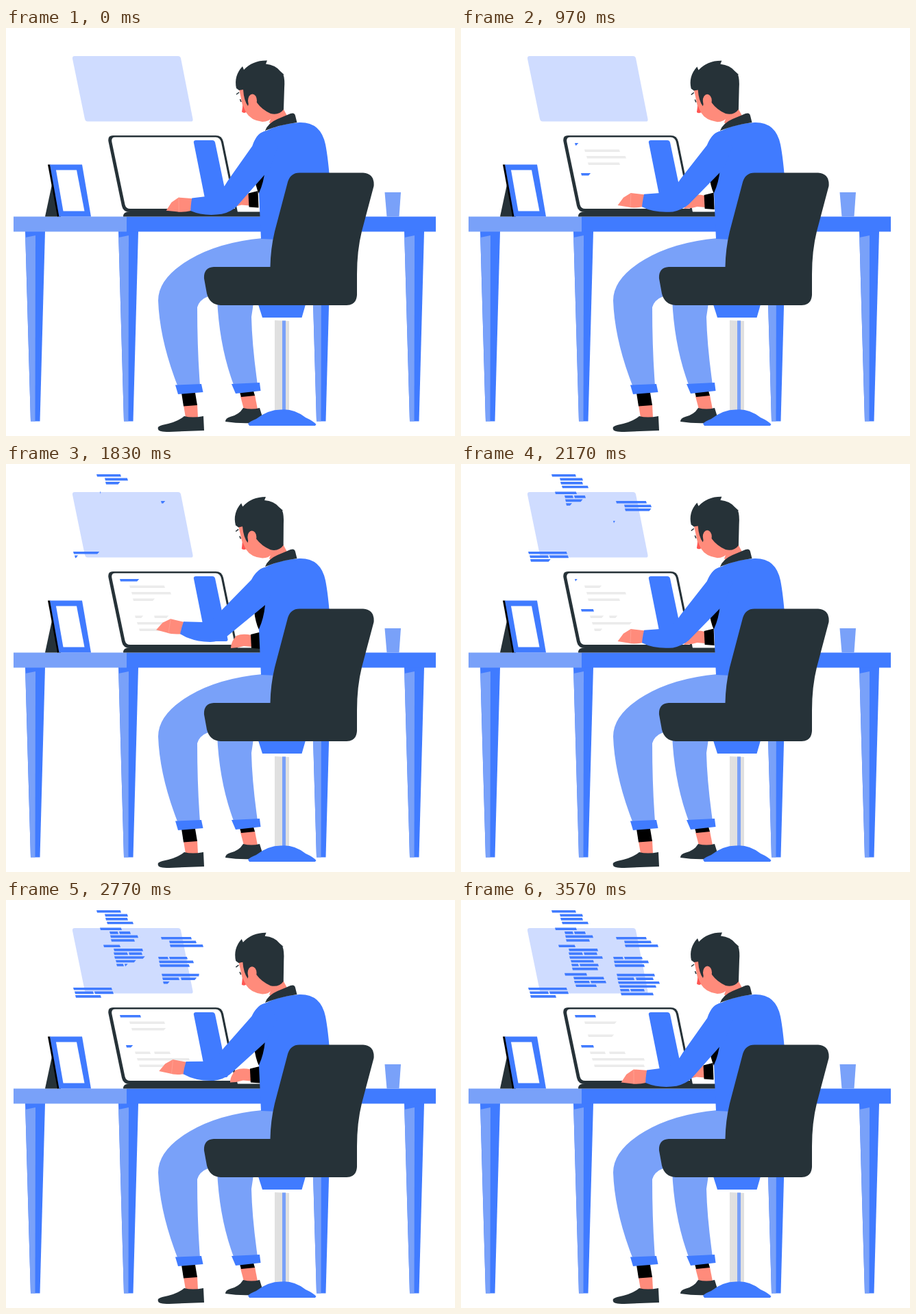
An HTML page that plays this animation: 655 by 596 pixels, repeating every 3610 ms.

```html
<!DOCTYPE html>
<html lang="en">
<head>
<meta charset="utf-8">
<title>Typing at a desk</title>
<style>
  html, body { margin: 0; width: 100%; height: 100%; overflow: hidden; background: #fff; }
  svg { display: block; width: 655px; height: 596px; }
  .blue { fill: #407bff; }
  .light { fill: #79a1f9; }
  .dark { fill: #263238; }
  .skin { fill: #ff8b7b; }
  .grey { fill: #e0e0e0; }
  .white { fill: #fff; }
</style>
</head>
<body>
<svg viewBox="0 0 655 596">
  <defs>
    <g id="leg">
      <path class="blue" d="M28 297H57L49.5 574.5H36Z"/>
      <path class="light" d="M28.3 306L43 303L42.5 574.5H36Z"/>
    </g>
  </defs>

  <path fill="#cfdcff" d="M100 41H251Q254 41 255 44L272.5 133Q273 136.5 270 136.5H119Q116 136.5 115 133L97 45Q96.5 41 100 41Z"/>
  <path id="code" class="blue"/>

  <!-- desk -->
  <use href="#leg"/><use href="#leg" x="136"/><use href="#leg" x="417"/><use href="#leg" x="553"/>
  <path class="blue" d="M176 275.5H627V297.5H176Z"/>
  <path class="light" d="M11 275.5H176V297.5H11Z"/>
  <path class="light" d="M552.5 240H576L573.5 275.5H555.5Z"/>

  <!-- photo stand -->
  <path class="dark" d="M57 275.5L68 224L76 275.5Z"/>
  <path d="M61 199.5H64.5L80 275.5H75Z"/>
  <path class="blue" d="M64 199.5H111L124 275.5H77.5Z"/>
  <path class="white" d="M73 207.5H103L114.5 267.5H83.5Z"/>

  <!-- laptop -->
  <path class="dark" d="M156 157H306Q315 157 317 166L338 269H181Q171 269 169 260L149.5 166Q148 157 156 157Z"/>
  <path class="white" d="M159 159.5H306Q312 159.5 314 167L334 264H181Q175 264 173.5 258L154.5 167Q153 159.5 159 159.5Z"/>
  <path class="dark" d="M171 275.5Q171 269 178 268.5H371V275.5Z"/>
  <path class="blue" d="M277 164H301Q304 164 305 167L323.5 256Q324 259 321 259H296Q292 259 291.5 256L274 168Q273 164 277 164Z"/>
  <path id="text" fill="#ebebeb"/>
  <path id="heads" class="blue"/>

  <!-- far arm -->
  <path d="M380 200L362 215Q364 232 369 242L380 230Z"/>
  <g id="farArm">
    <path class="skin" d="M328 269Q328 260 336 251Q345 247 358 250L359 267L347 266Q338 269 328 269Z"/>
    <path d="M357 249L371 245.5L372 270L358 269Z"/>
  </g>

  <!-- legs and shoes -->
  <path class="skin" d="M259 551L279 550L280 569H262Z"/>
  <path class="skin" d="M342 538L363 536L367 557H347Z"/>
  <path d="M256 533H276L279 551L259 552.5Z"/>
  <path d="M341 532L361 530L363 537L343 539Z"/>
  <path class="dark" d="M222 586Q220 582 228 580Q250 576 260 567Q272 570 288 567L289 588L238 590Q222 590 222 586Z"/>
  <path class="dark" d="M320 575Q320 570 327 568Q340 565 346 555Q358 558 370 555L374 568L360 577Q340 578 320 575Z"/>
  <path class="light" d="M308 395Q311 465 332 521H367Q359 465 358 422L361 402Z"/>
  <path class="light" d="M390 307H374Q310 313 268 338Q222 365 222 398Q224 455 250 522H283Q279 470 279 408Q282 397 295 392L390 370Z"/>
  <path class="blue" d="M247 521.5L285 520L287.5 532L251 535Z"/>
  <path class="blue" d="M329 520L370 518L371.5 530L335 534Z"/>

  <!-- torso -->
  <path class="skin" d="M384 138L392 118L404 117L411 130L392 146Z"/>
  <path class="blue" d="M378 151Q398 140 428 138Q459 137 466 170Q470 190 473 230L420 310L372 308L369 241Q376 226 378 206L360 178Q362 154 378 151Z"/>
  <path class="dark" d="M378 150Q382 139 396 133L415 125Q421 123 422 128L424.5 138Q400 141 378 150Z"/>

  <g id="head">
    <path class="skin" d="M340 89L345 113V123H350Q357 135 374 137Q384 137 389 130L404 118V90Z"/>
    <path fill="#ff5652" d="M345.5 113L344 122.5Q347 125 350 123Z"/>
    <path class="dark" d="M336 88Q332 70 345 56L347 61Q360 47 381 47.5L379 52.5Q393 54 400 63L406 68.5L404.5 68Q407 75 406 88L405 119Q398 128 386 125Q373 119 366 109L357 98L353 114Q347 106 346 90L340 91Z"/>
    <ellipse class="skin" cx="359.5" cy="106" rx="6.5" ry="9.5"/>
    <path fill="none" stroke="#263238" stroke-width="1.5" d="M336 97L340 94M341.5 104L343 108"/>
  </g>

  <!-- chair -->
  <path class="blue" d="M368 404H437L431.5 423H374Z"/>
  <path class="grey" d="M392 427L413 428V560H392Z"/>
  <path class="light" d="M403 427.5H408V560H403Z"/>
  <path class="blue" d="M353 578Q355 575 365 571Q383 557 402 557.5Q420 556 437 569Q448 574 452.5 579L451 581H355Z"/>
  <path class="dark" d="M428 211.5H521Q538 213 536.5 231L519 297Q512 325 512 360V390Q511 405 497 405H313Q297 404 293 388L289 366Q288 350 303 349H385.5Q386 322 392 297L411 225Q415 211.5 428 211.5Z"/>

  <!-- near arm -->
  <g id="nearArm">
    <path class="skin" d="M219 242L228.5 231.5L240 226L261 231L256 248Q242 249 234 246Z"/>
    <path d="M240 227L237 246.5" stroke="#ffa598" stroke-width=".7"/>
    <path class="blue" d="M381 150Q366 153 358 169L315 213Q305 227 286 231L259 230Q256 238 254 248Q272 259.5 298 260Q312 259 322 252L378 206L395 175Z"/>
  </g>
</svg>
<script>
const LOOP = 3610, STROKE = 1200, SPEED = 0.17, ROW = 5.55;
const el = id => document.getElementById(id);

// A paragraph typed row by row; a row is x, width and optionally a second x, width
const paragraph = (top, start, step, ...rows) => rows.flatMap(([x, w, x2, w2], i) => {
  const y = top + i * ROW, t = start + i * step;
  return x2 ? [[x, y, w, t], [x2, y, w2, t + 60]] : [[x, y, w, t]];
});

const code = [];
const add = (...args) => code.push(...paragraph(...args));
add(15, 1280, 215, [132, 36], [144, 34], [145, 33], [147, 39]);
add(128, 1612, 195, [98, 57], [100, 28, 129, 28], [101, 38]);
add(54, 1800, 75, [226, 45], [238, 40], [239, 49]);
add(40.5, 1830, 98, [137, 32], [151, 13, 165, 17], [152, 41], [153, 35]);
add(83, 2160, 110, [222, 15, 238, 27], [223, 51], [224, 44]);
add(65.5, 2250, 88, [142, 25], [157, 43], [157, 21, 179, 20], [158, 49], [160, 34], [161, 11, 173, 28], [162, 38]);
add(107.8, 2440, 140, [227, 56], [228, 25, 255, 26], [229, 61], [231, 54], [232, 14, 247, 21], [233, 48]);
add(106.8, 2850, 50, [151, 33], [164, 45], [165, 23, 189, 23], [167, 31]);

// Laptop lines: x, y, width, then retype times; a negative time clears the line
const heads = [
  [166, 168, 31, 20, 946, 1671, 2155],
  [175, 212, 19, 894, -1790, 1900, 2717]
];
const text = [
  [180, 177.5, 52, 164, 1100, 2029, 3300],
  [183, 187, 58, 420, 1450, 2482, -3500],
  [185, 196.5, 47, 600, 1648, -2740, 3352],
  [188, 221.5, 23, 1130, 1765, 2058],
  [216, 221.5, 24, 1200, 1712, 2105],
  [191, 231, 77, 1500, 1835],
  [194, 240.5, 74, 1550, 2105]
];

// A slanted bar uncovered from the left by an edge leaning the other way
function bar([x, y, w, ...times], t) {
  const last = times.filter(s => Math.abs(s) <= t).pop();
  if (!(last >= 0)) return "";
  const edge = (t - last) * SPEED + 1;
  const top = Math.min(edge, w - 1.2);
  const bottom = Math.min(Math.max(edge - 3, 1), w);
  return `M${x} ${y}H${x + top}L${x + bottom} ${y + 3.6}H${x + 1}Z`;
}
const drawBars = (id, bars, t) => el(id).setAttribute("d", bars.map(b => bar(b, t)).join(""));

function draw() {
  const t = performance.now() % LOOP;
  const lift = (1 - Math.cos(t / STROKE * 2 * Math.PI)) / 2;
  el("nearArm").setAttribute("transform", `rotate(${9.2 * (lift - 1)} 380 163)`);
  el("farArm").setAttribute("transform", `translate(${3.5 * (lift - 1)} ${7.5 * (lift - 1)})`);
  el("head").setAttribute("transform", `rotate(${-1.4 * lift} 398 132)`);
  drawBars("code", code, t);
  drawBars("heads", heads, t);
  drawBars("text", text, t);
  requestAnimationFrame(draw);
}
draw();
</script>
</body>
</html>
```
